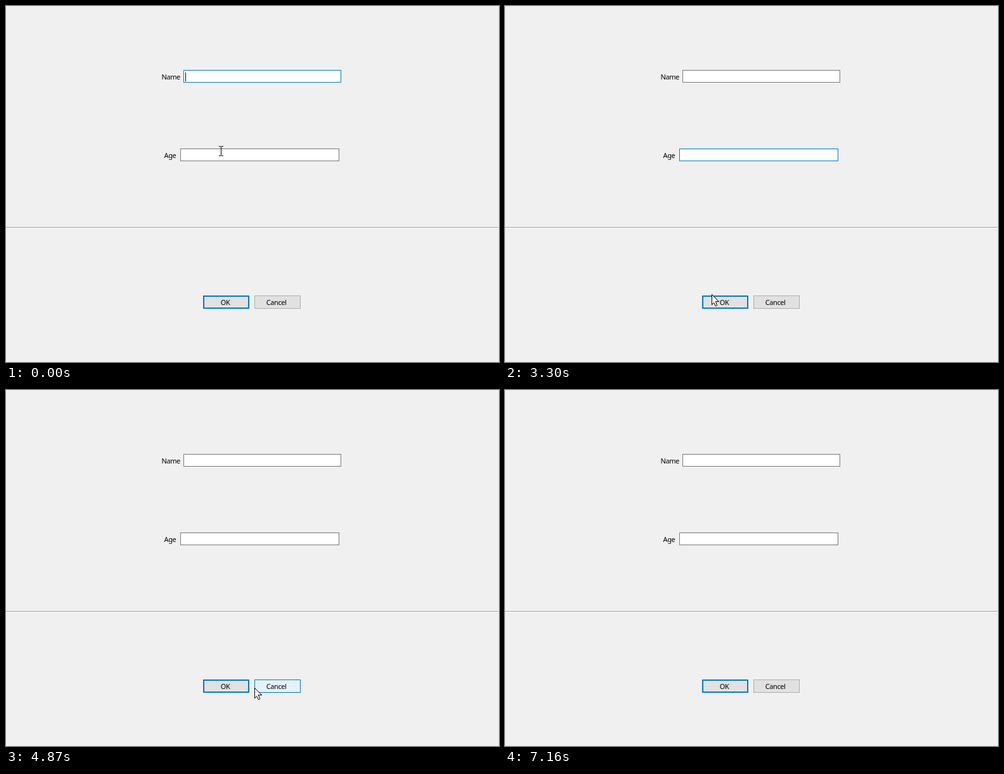
These frames come from a looping animation (778x562 px, 8000 ms). An HTML page:

```html
<!DOCTYPE html>
<html lang="en">
<head>
<meta charset="utf-8">
<title>Form dialog</title>
<style>
  html, body { margin: 0; width: 100%; height: 100%; overflow: hidden; background: #f0f0f0; }
  svg { display: block; }
  text { font: 11px "Noto Sans", "Open Sans", sans-serif; letter-spacing: -.4px; fill: #000; }
  .crisp { shape-rendering: crispEdges; }
</style>
</head>
<body>
<svg width="778" height="562" viewBox="0 0 778 562">
  <rect width="778" height="562" fill="#f0f0f0"/>
  <g class="crisp">
    <rect y="349" width="777" height="1" fill="#a0a0a0"/>
    <rect y="350" width="777" height="1" fill="#fff"/>
    <g id="boxes"></g>
    <rect id="caret" width="1" height="14"/>
  </g>
  <text x="245.5" y="116">Name</text>
  <text x="249.5" y="240">Age</text>
  <text x="338.7" y="472">OK</text>
  <text x="410.7" y="472">Cancel</text>
  <path id="beam" class="crisp" fill="none" stroke="#000"
    d="M-3 -7.5H0M1 -7.5H4M.5 -7V7M-3 7.5H0M1 7.5H4"/>
  <path id="arrow" class="crisp" fill="#fff" stroke="#000"
    d="M.5 .5V16.5L3.5 13.5L6.5 18.5H7.5L8.5 17.5L6.5 11.5H11.5Z"/>
</svg>
<script>
const LOOP = 8000, TICK = 120, BLINK = 530;
const AGE_CLICK = 2320, OK_CLICK = 3660, EXIT = 7160;
const BLUE = '#0078d7';

const boxes = {
  name: { x: 280, y: 101, w: 249, h: 20, field: true },
  age: { x: 275, y: 225, w: 251, h: 20, field: true },
  ok: { x: 311, y: 457, w: 73, h: 21 },
  cancel: { x: 392, y: 457, w: 73, h: 21 }
};

// Pointer goals: arrival time, ticks on the way, x, y
const goals = [
  [0, 1, 339, 229], [480, 4, 376, 121], [1100, 1, 376, 114], [2070, 5, 345, 234],
  [3300, 5, 326, 455], [3540, 2, 334, 461], [4140, 4, 408, 476], [4380, 2, 423, 470],
  [5230, 6, 382, 470], [5350, 1, 362, 398], [5830, 4, 295, 194], [6070, 1, 370, 261],
  [6190, 1, 481, 398], [6790, 5, 643, 549], [7040, 1, 646, 554]
];

const el = id => document.getElementById(id);
const [caret, beam, arrow] = ['caret', 'beam', 'arrow'].map(el);
const show = (node, on) => node.setAttribute('visibility', on ? 'visible' : 'hidden');
const set = (node, attrs) => {
  for (const key in attrs) node.setAttribute(key, attrs[key]);
};
const easeOut = p => p * (2 - p);

for (const box of Object.values(boxes)) {
  box.node = document.createElementNS('http://www.w3.org/2000/svg', 'rect');
  el('boxes').append(box.node);
}

// The pointer moves once per tick and rests between goals.
function pointer(t) {
  let [, , x, y] = goals[0];
  for (const [end, ticks, gx, gy] of goals) {
    const done = Math.floor((t - end) / TICK + ticks);
    if (done <= 0) break;
    const p = easeOut(Math.min(done / ticks, 1));
    x += (gx - x) * p;
    y += (gy - y) * p;
  }
  return { x: Math.round(x), y: Math.round(y) };
}

function partAt({ x, y }) {
  return Object.keys(boxes).find(id => {
    const b = boxes[id];
    return x >= b.x && x < b.x + b.w && y >= b.y && y <= b.y + b.h;
  });
}

function paint({ x, y, w, h, node }, fill, stroke, line = 1) {
  set(node, {
    x: x + line / 2, y: y + line / 2, width: w - line, height: h - line,
    fill, stroke, 'stroke-width': line
  });
}

function draw(t) {
  const pos = pointer(t);
  const under = partAt(pos);
  // Hover shows once the pointer has stayed on a part for a tick.
  const hot = t >= TICK && partAt(pointer(t - TICK)) === under ? under : '';
  const pressed = t >= OK_CLICK && t < OK_CLICK + TICK;
  const active = t < AGE_CLICK ? 'name' : t < OK_CLICK + TICK ? 'age' : '';

  for (const id of ['name', 'age']) {
    paint(boxes[id], '#fff', hot === id ? '#171717' : active === id ? BLUE : '#7a7a7a');
  }
  if (pressed) paint(boxes.ok, '#cce4f7', '#005499');
  else if (hot === 'ok') paint(boxes.ok, '#e5f1fb', BLUE);
  else paint(boxes.ok, '#e1e1e1', BLUE, 2);
  if (hot === 'cancel') paint(boxes.cancel, '#e5f1fb', BLUE);
  else paint(boxes.cancel, '#e1e1e1', '#adadad');

  const since = active === 'name' ? t + 130 : t - AGE_CLICK;
  show(caret, active && Math.floor(since / BLINK) % 2 === 0);
  if (active) set(caret, { x: boxes[active].x + 3, y: boxes[active].y + 3.5 });

  const typing = Boolean(under && boxes[under].field);
  show(beam, typing);
  show(arrow, !typing && t < EXIT);
  set(typing ? beam : arrow, { transform: `translate(${pos.x} ${pos.y})` });
}

const start = performance.now();
function tick() {
  draw((performance.now() - start) % LOOP);
  requestAnimationFrame(tick);
}
tick();
</script>
</body>
</html>
```
